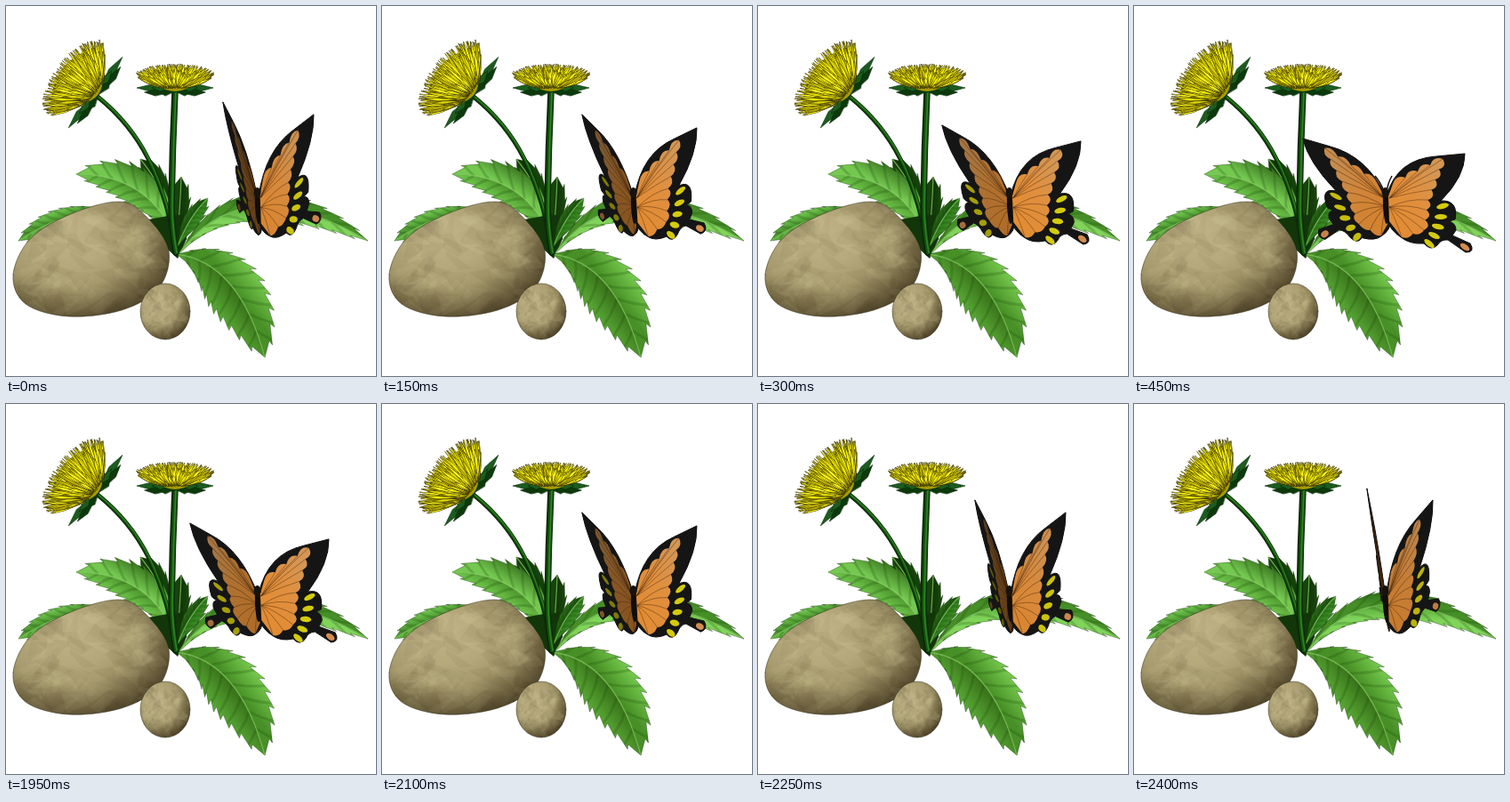
Recreate the animation shown at these times as an HTML page with a canvas. Size 416x416 px, loop 2550 ms.

```html
<!DOCTYPE html>
<html lang="en">
<head>
<meta charset="utf-8">
<title>Butterfly on a leaf</title>
<style>
html, body { margin: 0; width: 100%; height: 100%; overflow: hidden; background: #fff; }
canvas { display: block; width: 416px; height: 416px; }
</style>
</head>
<body>
<canvas id="stage" width="416" height="416"></canvas>
<script>
const ctx = document.getElementById('stage').getContext('2d');
const scene = document.createElement('canvas');
scene.width = scene.height = 416;
const g = scene.getContext('2d');

let seed = 11;
const rnd = () => (seed = (seed * 16807) % 2147483647) / 2147483647;
const spread = r => (rnd() * 2 - 1) * r;
const mix = (a, b, t) => a + (b - a) * t;
const mixPoint = (a, b, t) => [mix(a[0], b[0], t), mix(a[1], b[1], t)];
const bezier = (a, b, c, t) => mixPoint(mixPoint(a, b, t), mixPoint(b, c, t), t);

function poly(points) {
  const p = new Path2D();
  for (const pt of points) p.lineTo(...pt);
  p.closePath();
  return p;
}

function stroke(c, path, color, width) {
  c.strokeStyle = color;
  c.lineWidth = width;
  c.stroke(path);
}

function gradient(c, from, to, colors) {
  const grad = c.createLinearGradient(...from, ...to);
  colors.forEach((color, i) => grad.addColorStop(i / (colors.length - 1), color));
  return grad;
}

// Toothed leaf along a curved rib; each half has its own width and colours (rib to edge).
function leaf(rib, widths, tones, teeth) {
  const at = (t, offset) => {
    const [x, y] = bezier(...rib, t);
    const [ax, ay] = mixPoint(rib[0], rib[1], t), [bx, by] = mixPoint(rib[1], rib[2], t);
    const k = offset / Math.hypot(bx - ax, by - ay);
    return [x - (by - ay) * k, y + (bx - ax) * k];
  };
  const bulge = t => Math.pow(Math.sin(Math.PI * Math.pow(t, 1.15)), .85);
  const mid = new Path2D();
  mid.moveTo(...rib[0]);
  mid.quadraticCurveTo(...rib[1], ...rib[2]);

  [-1, 1].forEach((side, half) => {
    const w = widths[half] * side, edge = [rib[0]];
    for (let i = 1; i < teeth; i++) {
      const t = i / teeth;
      edge.push(at(Math.min(1, t + .4 / teeth), w * bulge(t)), at(t + .1 / teeth, w * bulge(t) * .83));
    }
    edge.push(rib[2]);
    for (let i = 10; i > 0; i--) edge.push(at(i / 10, 0));
    const shape = poly(edge);
    g.fillStyle = gradient(g, at(.55, 0), at(.55, w), tones[half]);
    g.fill(shape);
    g.save();
    g.clip(shape);
    for (let t = .08; t < .9; t += .11) {
      const vein = new Path2D();
      vein.moveTo(...at(t, 0));
      vein.quadraticCurveTo(...at(t + .08, w * .35), ...at(t + .14, w));
      stroke(g, vein, 'rgba(25,70,5,.22)', 3);
    }
    g.restore();
    stroke(g, shape, 'rgba(20,55,5,.55)', .7);
  });
  stroke(g, mid, 'rgba(150,225,110,.6)', 1.3);
}

function stem(d, width) {
  const path = new Path2D(d);
  g.lineCap = 'round';
  stroke(g, path, '#0a2a06', width);
  g.save();
  g.translate(.5, 0);
  stroke(g, path, '#165010', width * .6);
  g.translate(.5, 0);
  stroke(g, path, '#2b8420', width * .22);
  g.restore();
}

// Petals run from the base to a tilted ellipse of tips; sepals spread along its long axis.
function flower(base, center, rx, ry, turn) {
  const c = Math.cos(turn), s = Math.sin(turn);
  const place = ([x, y], u, v) => [x + c * u - s * v, y + s * u + c * v];
  for (const side of [-1, 1]) {
    for (let i = 0; i < 4; i++) {
      const reach = side * rx * (1 - i * .2), drop = (i % 2) * 5;
      const sepal = poly([place(base, 0, 1), place(base, reach * .6, -7 + drop),
        place(base, reach, -3 + drop), place(base, reach * .65, 1 + drop)]);
      g.fillStyle = i % 2 ? '#0d3a0c' : '#1c5c20';
      g.fill(sepal);
      stroke(g, sepal, '#0a2c08', .6);
    }
  }
  const cup = new Path2D();
  cup.moveTo(...place(center, -rx * .85, 0));
  cup.quadraticCurveTo(...place(center, 0, -ry * 1.5), ...place(center, rx * .85, 0));
  cup.quadraticCurveTo(...place(base, rx * .4, 0), ...place(base, 0, 1));
  cup.quadraticCurveTo(...place(base, -rx * .4, 0), ...place(center, -rx * .85, 0));
  g.fillStyle = '#a79b00';
  g.fill(cup);
  for (let i = 0; i < 230; i++) {
    const a = i * 2.39996, far = i < 130 ? mix(.9, 1.03, rnd()) : mix(.25, .85, rnd());
    const u = Math.cos(a) * far, v = Math.sin(a) * far;
    const tip = place(center, u * rx, v * ry);
    const root = mixPoint(place(base, u * rx * .3, -2), tip, mix(.05, .35, rnd()));
    const belly = mixPoint(root, tip, .6);
    const k = 1.3 / Math.hypot(tip[0] - root[0], tip[1] - root[1]);
    const nx = (root[1] - tip[1]) * k, ny = (tip[0] - root[0]) * k;
    const petal = poly([root, [belly[0] + nx, belly[1] + ny], tip, [belly[0] - nx, belly[1] - ny]]);
    stroke(g, petal, '#3a3400', .8);
    g.fillStyle = ['#f2ec00', '#e0d800', '#fff820', '#b9ae00'][i % 4];
    g.fill(petal);
  }
}

// Closed curve through all the given points.
function through(points) {
  const p = new Path2D(), n = points.length, at = i => points[(i + n) % n];
  p.moveTo(...at(0));
  for (let i = 0; i < n; i++) {
    const [a, b, c, d] = [-1, 0, 1, 2].map(k => at(i + k));
    p.bezierCurveTo(b[0] + (c[0] - a[0]) / 6, b[1] + (c[1] - a[1]) / 6,
      c[0] - (d[0] - b[0]) / 6, c[1] - (d[1] - b[1]) / 6, ...c);
  }
  return p;
}

function rock(shape, cx, cy, rx, ry) {
  g.save();
  g.clip(shape);
  g.translate(cx, cy);
  g.scale(rx, ry);
  const light = g.createRadialGradient(-.25, -.3, .1, -.3, -.35, 1.5);
  ['#bbb083', '#b5a97c', '#a5996d', '#776b47', '#453b22'].forEach((c, i) => light.addColorStop(i / 4, c));
  g.fillStyle = light;
  g.fillRect(-1.2, -1.2, 2.4, 2.4);
  for (let i = 0; i < 110; i++) {
    const x = spread(1), y = spread(1), r = .17;
    g.fillStyle = i % 2 ? 'rgba(255,245,200,.05)' : 'rgba(40,32,10,.05)';
    g.fill(poly([[x + spread(r), y - r], [x + r, y + spread(r)], [x + spread(r), y + r], [x - r, y + spread(r)]]));
  }
  g.restore();
  stroke(g, shape, 'rgba(40,34,15,.6)', .8);
}

function paintScene() {
  const dark = [['#143d0a', '#1f5a12'], ['#0f3208', '#1a4c10']];
  leaf([[115, 228], [60, 233], [14, 264]], [14, 13], [['#57a838', '#6cc048'], ['#4a9630', '#7bd056']], 9);
  leaf([[192, 268], [196, 225], [197, 192]], [16, 12], dark, 5);
  leaf([[188, 235], [170, 195], [151, 172]], [12, 14], dark, 6);
  leaf([[192, 268], [166, 190], [79, 189]], [19, 26], [['#4c942c', '#6fc64b'], ['#74c850', '#356f1c']], 11);
  g.fillStyle = '#12360a';
  g.fill(poly([[160, 240], [182, 236], [204, 234], [203, 262], [193, 284], [180, 272]]));
  leaf([[193, 270], [205, 237], [227, 216]], [9, 12], [['#1b5010', '#2c7419'], ['#2f7a1c', '#3f9228']], 6);
  leaf([[194, 279], [265, 180], [407, 264]], [17, 17], [['#468f28', '#276516'], ['#55a536', '#80d45a']], 14);
  leaf([[192, 279], [262, 288], [291, 395]], [34, 35], [['#478f26', '#7bd052'], ['#376f18', '#5cae38']], 12);

  stem('M103 102Q140 132 160 172Q184 222 191 277', 5);
  stem('M190 96Q187 160 186 224Q186 250 191 277', 7.5);
  flower([103, 99], [76, 80], 50, 21, -.92);
  flower([190, 95], [190, 77], 43, 12, 0);

  rock(through([[8, 302], [28, 261], [75, 233], [128, 220], [158, 237], [183, 275], [172, 317], [130, 342], [70, 349], [22, 335]]),
    96, 285, 89, 65);
  const pebble = new Path2D();
  pebble.ellipse(179, 343.5, 28, 31.5, 0, 0, Math.PI * 2);
  rock(pebble, 179, 343.5, 28, 31.5);
}

// One wing, described fully open; both sides are mapped from it.
const hinge = [284, 210], foreTip = [372, 167], tailTip = [380, 275];
const wingEdge = new Path2D('M284 213Q296 172 340 169L372 166Q372 192 345 219Q365 218 361 240L354 242Q362 244 362 252L358 258' +
  'L378 267Q384 277 373 277L353 263Q345 262 341 269Q334 276 326 267Q310 268 300 260Q288 252 284 240Z');
const patch = new Path2D('M286 214L291 200');
const veins = new Path2D();

function scallops(from, to, count, bulge) {
  const k = bulge / Math.hypot(to[0] - from[0], to[1] - from[1]);
  const nx = (to[1] - from[1]) * k, ny = (from[0] - to[0]) * k;
  for (let i = 1; i <= count; i++) {
    const [mx, my] = mixPoint(from, to, (i - .5) / count), end = mixPoint(from, to, i / count);
    patch.quadraticCurveTo(mx + nx, my + ny, ...end);
    veins.moveTo(287, end[1] > 215 ? 226 : 216);
    veins.quadraticCurveTo(mix(287, end[0], .5), mix(214, end[1], .55), ...end);
  }
}
scallops([291, 200], [347, 172], 4, 8);
scallops([347, 172], [330, 218], 4, 8);
scallops([330, 218], [326, 252], 3, 8);
scallops([326, 252], [301, 260], 2, 5);
patch.lineTo(287, 242);

function ellipse(x, y, rx, ry, turn, color) {
  ctx.beginPath();
  ctx.ellipse(x, y, rx, ry, turn, 0, Math.PI * 2);
  ctx.fillStyle = color;
  ctx.fill();
}

const frameOf = (o, a, b) => new DOMMatrix([a[0] - o[0], a[1] - o[1], b[0] - o[0], b[1] - o[1], ...o]);
const toUnit = frameOf(hinge, foreTip, tailTip).inverse();

// The affine map keeps the hinge and carries both tips to their new places.
function drawWing(root, tip, tail, lit) {
  const tone = (r, gr, b) => `rgb(${r * lit},${gr * lit},${b * lit})`;
  const m = frameOf(root, tip, tail).multiply(toUnit);
  const outline = new Path2D();
  outline.addPath(wingEdge, m);
  stroke(ctx, outline, '#0b0806', 1);
  ctx.save();
  ctx.transform(m.a, m.b, m.c, m.d, m.e, m.f);
  ctx.fillStyle = '#151515';
  ctx.fill(wingEdge);
  ctx.fillStyle = gradient(ctx, [290, 232], [345, 195], [tone(226, 140, 52), tone(224, 143, 62), tone(212, 150, 84)]);
  ctx.fill(patch);
  stroke(ctx, veins, 'rgba(60,32,10,.6)', .7);
  for (let i = 0; i < 5; i++) {
    const t = i / 4, [x, y] = bezier([347, 225], [344, 250], [332, 267], t);
    ellipse(x, y, 7, 3, mix(-.25, .7, t), tone(212, 203, 12));
  }
  ellipse(372, 271, 6, 3, .6, tone(212, 140, 80));
  ctx.restore();
}

// Tips of the right (r) and left (l) wing, and how dark the left one is.
const poses = {
  shut: { r: [[336, 109], [344, 227]], l: [[262, 96], [277, 214]], lit: [.88, .36] },
  low:  { r: [[346, 123], [354, 240]], l: [[244, 109], [260, 226]], lit: [.96, .45] },
  half: { r: [[354, 138], [364, 252]], l: [[225, 123], [244, 237]], lit: [1, .6] },
  wide: { r: [[363, 153], [372, 265]], l: [[207, 135], [225, 248]], lit: [1, .78] },
  open: { r: [foreTip, tailTip], l: [[190, 150], [208, 259]], lit: [1, .93], feelers: true }
};
const LOOP = 2550, STEP = 150;
const opening = ['low', 'half', 'wide', 'open'], closing = ['wide', 'half', 'low', 'shut'];

function poseAt(t) {
  const name = t < 1950 ? opening[Math.min(3, Math.floor(t / STEP))] : closing[Math.floor((t - 1950) / STEP)];
  return poses[name];
}

function draw(now) {
  const pose = poseAt(now % LOOP);
  ctx.fillStyle = '#fff';
  ctx.fillRect(0, 0, 416, 416);
  ctx.drawImage(scene, 0, 0);
  if (pose.feelers) stroke(ctx, new Path2D('M281 208Q277 198 271 191M284 208Q286 198 290 191'), '#111', 1.5);
  drawWing([282, 210], ...pose.l, pose.lit[1]);
  drawWing(hinge, ...pose.r, pose.lit[0]);
  ellipse(283, 225, 3, 20, -.05, '#100d0b');
  ellipse(282.5, 210, 4, 6, 0, '#171310');
  requestAnimationFrame(() => draw(performance.now()));
}

paintScene();
draw(0);
</script>
</body>
</html>
```
